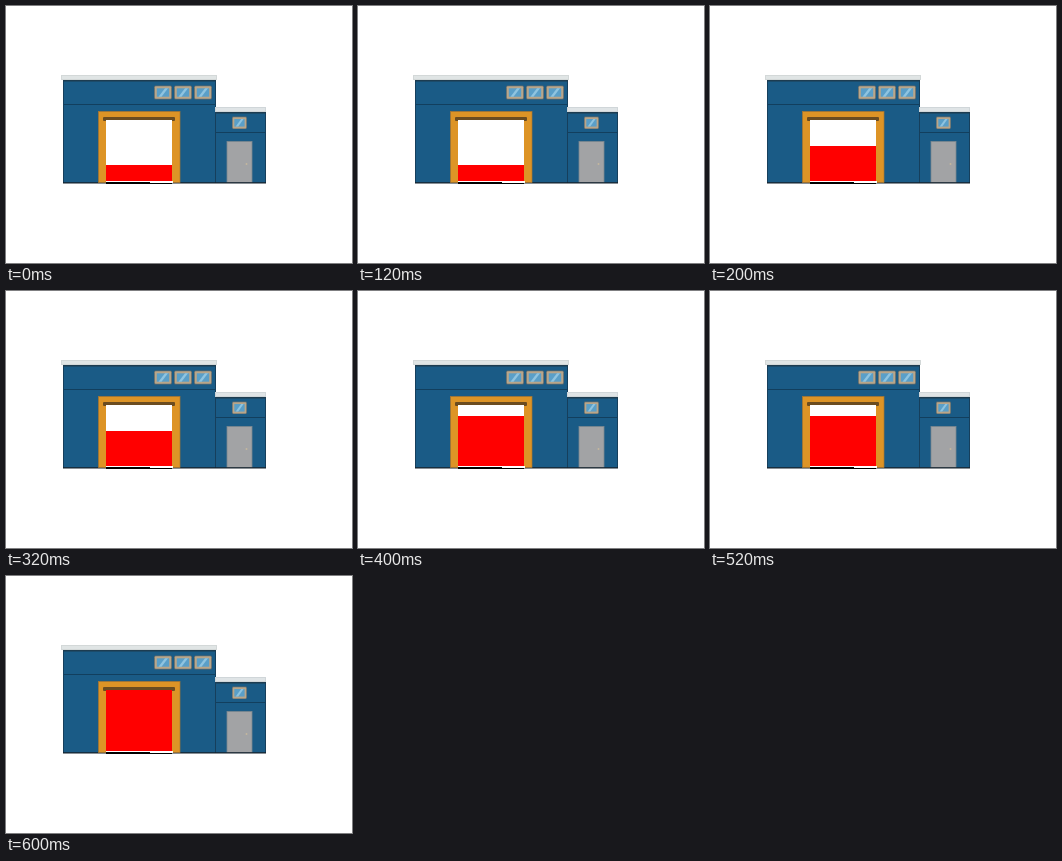
Recreate the animation shown at these times as an HTML page. Size 346 by 257 pixels, loop 800 ms.

```html
<!DOCTYPE html>
<html lang="en">
<head>
<meta charset="utf-8">
<title>Garage door</title>
<style>
html, body { margin: 0; width: 100%; height: 100%; overflow: hidden; background: #fff; }
svg { display: block; width: 346px; height: 257px; }
</style>
</head>
<body>
<svg viewBox="0 0 346 257">
  <defs>
    <g id="pane">
      <rect width="18" height="14" rx="1.5" fill="#5f6a6c"/>
      <rect x=".8" y=".8" width="16.4" height="12.4" rx="1" fill="#b9a68a"/>
      <rect x="2.8" y="2.8" width="12.4" height="8.400" fill="#5a9fc8"/>
      <path d="M4.500 11.200 11 2.800H14L7.500 11.200Z" fill="#8fc4e0"/>
    </g>
  </defs>

  <!-- main hall -->
  <rect x="57" y="74" width="153" height="103" fill="#1a5b86"/>
  <path d="M57.500 75V177M209.500 75V177" stroke="#163f5c"/>
  <path d="M57 98.500H210" stroke="#123f5e"/>
  <rect x="55" y="69" width="156" height="5" fill="#d3d8d8"/>
  <rect x="56" y="70" width="154" height="3" fill="#e0e5e5"/>
  <path d="M57 74.800H210" stroke="#1d3c50" stroke-width="1.600"/>

  <!-- side room -->
  <rect x="210" y="107" width="50" height="70" fill="#1a5b86"/>
  <path d="M259.500 107V177" stroke="#163f5c"/>
  <path d="M210 126.500H260" stroke="#123f5e"/>
  <rect x="209" y="101" width="51" height="5" fill="#d0d6d9"/>
  <rect x="210" y="102" width="49" height="3" fill="#dfe4e6"/>
  <path d="M210 106.700H260" stroke="#1d3c50" stroke-width="1.400"/>
  <rect x="221" y="135.500" width="25" height="41" fill="#a2a3a5" stroke="#7b8790" stroke-width=".8"/>
  <circle cx="240.500" cy="158" r="1" fill="#c4b79f"/>

  <use href="#pane" x="148" y="79.500"/>
  <use href="#pane" x="168" y="79.500"/>
  <use href="#pane" x="188" y="79.500"/>
  <use href="#pane" transform="translate(226 110.500) scale(.83 .9)"/>

  <!-- gate -->
  <path d="M57 176.800H260" stroke="#14202a" stroke-width="1.200"/>
  <rect x="92.500" y="105.500" width="81.500" height="71" fill="#dd9426" stroke="#a87530" stroke-width=".7"/>
  <rect x="97" y="111" width="72" height="4" rx="1" fill="#6b4c20"/>
  <g shape-rendering="crispEdges">
    <rect x="100" y="114" width="66" height="63" fill="#fff"/>
    <rect x="166" y="175" width="1" height="2" fill="#fff"/>
    <rect x="100" y="176" width="44" height="2" fill="#000"/>
    <rect x="144" y="177" width="22" height="1" fill="#000"/>
    <rect id="door" x="100" width="66" fill="#f00"/>
  </g>
</svg>
<script>
const STEP = 200, FLOOR = 175;
const tops = [159, 140, 125, 114];
const door = document.getElementById("door");

function draw(now) {
  const top = tops[Math.floor(now / STEP) % tops.length];
  door.setAttribute("y", top);
  door.setAttribute("height", FLOOR - top);
}

const start = performance.now();
function tick() {
  draw(performance.now() - start);
  requestAnimationFrame(tick);
}
tick();
</script>
</body>
</html>
```
